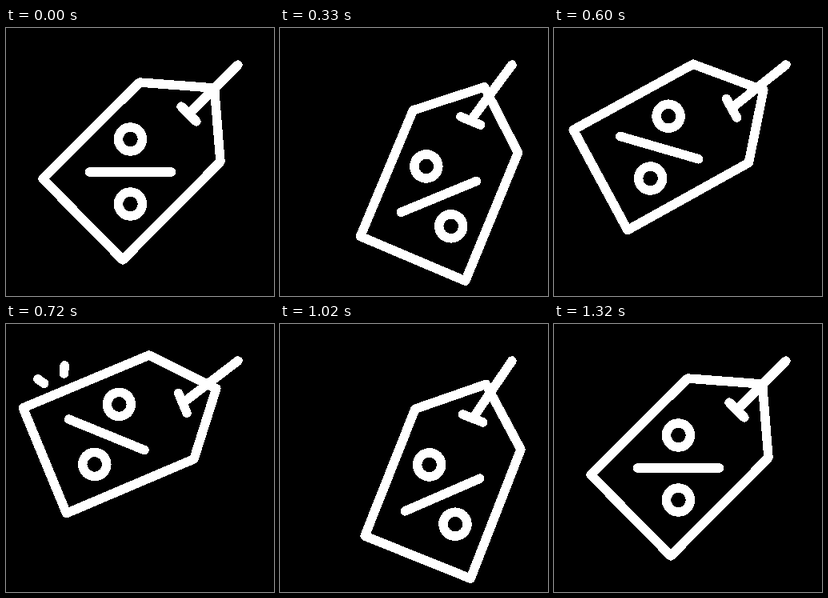
An HTML page that plays this animation: 335x335 px, repeating every 1.8 s.

```html
<!DOCTYPE html>
<html lang="en">
<head>
<meta charset="utf-8">
<title>Swinging price tag</title>
<style>
  html, body { margin: 0; height: 100%; overflow: hidden; background: #000; }
  svg { display: block; width: 100%; height: 100%; shape-rendering: crispEdges; }
  svg * { fill: none; stroke: #fff; stroke-width: 11.5; stroke-linecap: round; stroke-linejoin: round; }
</style>
</head>
<body>
<svg viewBox="0 0 335 335">
  <g id="tag">
    <path d="M167 68L260.500 75L268 167L146 290L46 188.500ZM104.500 180H206.500M219 98L238 117"/>
    <circle cx="155.500" cy="139" r="15"/>
    <circle cx="155.500" cy="220" r="15"/>
  </g>
  <line id="thread" x1="290" y1="46"/>
  <path class="spark" pathLength="1" d="M47.700 74.400L29.800 61.800"/>
  <path class="spark" pathLength="1" d="M72.500 62L74 39"/>
</svg>
<script>
const LOOP = 1800, STEP = 30;
const HOOK = { x: 290, y: 46 }, KNOT = { x: 228.5, y: 107.5 }, LENGTH = 87;

const tag = document.getElementById('tag');
const thread = document.getElementById('thread');
const sparks = document.querySelectorAll('.spark');

const clamp = u => Math.min(1, Math.max(0, u));
const progress = (t, start, end) => clamp((t - start) / (end - start));
const ease = u => (1 - Math.cos(Math.PI * u)) / 2;

// Eases from rest through each turning point { at, to } in degrees.
function swing(t, turns) {
  let angle = 0, start = 0;
  for (const { at, to } of turns) {
    angle += (to - angle) * ease(progress(t, start, at));
    if (t < at) break;
    start = at;
  }
  return angle;
}

const tagSwing = t => swing(t, [
  { at: 290, to: -23.5 }, { at: 700, to: 22.6 }, { at: 1030, to: -23.6 }, { at: 1305, to: 0 }
]);
const threadSwing = t => swing(t, [
  { at: 300, to: 8.8 }, { at: 680, to: -8.2 }, { at: 1045, to: 11 }, { at: 1320, to: 0 }
]);

function drawSparks(t) {
  const head = 1 - (1 - progress(t, 660, 900)) ** 2;
  const tail = progress(t, 690, 990);
  for (const spark of sparks) {
    spark.style.display = head > tail ? '' : 'none';
    spark.setAttribute('stroke-dasharray', `0 ${tail} ${head - tail} 2`);
  }
}

function draw(t) {
  const angle = (45 + threadSwing(t)) * Math.PI / 180;
  const x = HOOK.x - LENGTH * Math.cos(angle), y = HOOK.y + LENGTH * Math.sin(angle);
  thread.setAttribute('x2', x);
  thread.setAttribute('y2', y);
  tag.setAttribute('transform',
    `translate(${x} ${y}) rotate(${tagSwing(t)}) translate(${-KNOT.x} ${-KNOT.y})`);
  drawSparks(t);
}

const start = performance.now();
function tick() {
  const t = (performance.now() - start) % LOOP;
  draw(Math.floor(t / STEP) * STEP);
  requestAnimationFrame(tick);
}
tick();
</script>
</body>
</html>
```
